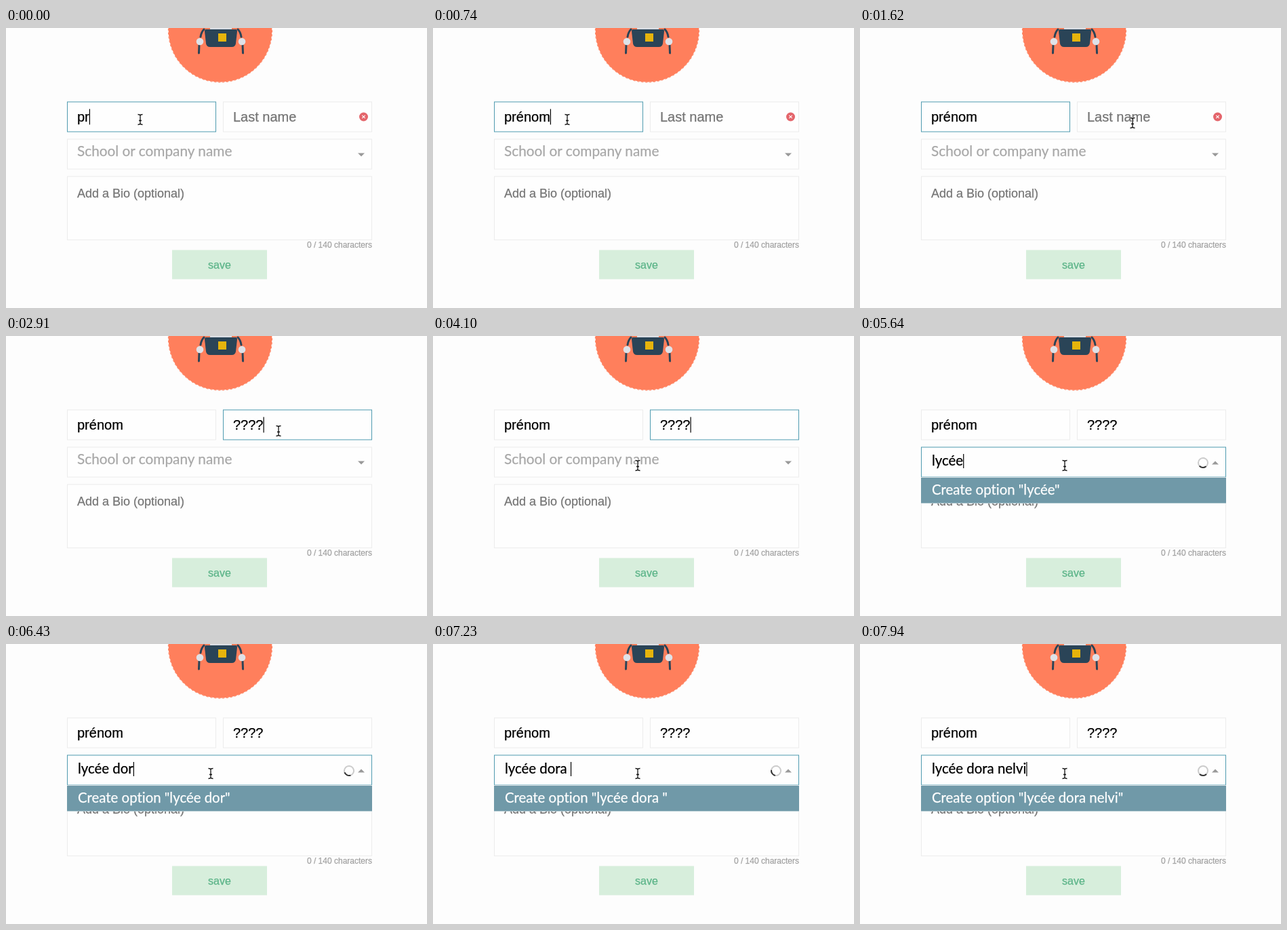
These frames come from a looping animation (621x413 px, 8000 ms). An HTML page:

```html
<!DOCTYPE html>
<html lang="en">
<head>
<meta charset="utf-8">
<title>Profile form</title>
<style>
  html, body { margin: 0; width: 100%; height: 100%; overflow: hidden; background: #fdfdfd; }
  svg { display: block; width: 621px; height: 413px; }
  text { font: 20px "Liberation Sans", Arial, sans-serif; color: #000; fill: currentColor; stroke: currentColor; stroke-width: .25px; }
  .hint { color: #757575; }
  .round { font: 20.4px Lato, sans-serif; font-variant-ligatures: none; }
  .field { fill: #fefefe; stroke: #ececec; }
  .field.focus { stroke: #4f9bb0; }
</style>
</head>
<body>
<svg viewBox="0 0 621 413">
  <!-- avatar -->
  <circle cx="316" cy="3.5" r="76.3" fill="#ff7f5c"/>
  <circle cx="316" cy="3.5" r="76.6" fill="none" stroke="#ff7f5c" stroke-dasharray="3 3"/>
  <path d="M301 0H333V3H301z" fill="#d9dde3"/>
  <path d="M295 2H339Q341 2 341 5L339 23Q338 28 333 28H301Q296 28 295 23L293 5Q293 2 295 2z" fill="#2a4457"/>
  <g fill="none" stroke="#2a4457" stroke-width="3" stroke-linecap="round">
    <path d="M292 2Q288 6 287 13M342 2Q346 6 347 13"/>
    <path d="M285 25L284.500 37M349 25L349.500 37"/>
  </g>
  <g fill="#dfe2e8"><circle cx="286" cy="20" r="5.300"/><circle cx="348" cy="20" r="5.300"/></g>
  <rect x="313" y="8" width="12" height="12" fill="#e6b40c"/>

  <!-- form -->
  <rect id="box0" class="field" x="90.500" y="109" width="219" height="44"/>
  <rect id="box1" class="field" x="320.500" y="109" width="219" height="44"/>
  <rect class="field" x="90.500" y="219" width="449" height="93.500"/>
  <text class="hint" x="105" y="250" style="font-size:18px">Add a Bio (optional)</text>
  <text x="540" y="324" text-anchor="end" style="font-size:12px;color:#a2a2a2">0 / 140 characters</text>
  <rect x="245" y="327.500" width="140" height="43" fill="#d7eedc"/>
  <text x="315" y="355" text-anchor="middle" style="font-size:16px;color:#5bb488">save</text>

  <text id="text0" x="105" y="138"/>
  <text id="hint1" class="hint" x="335" y="138">Last name</text>
  <text id="text1" x="335" y="138"/>
  <g id="error">
    <circle cx="527.500" cy="131" r="6.500" fill="#e4656b"/>
    <path d="M525.300 128.800l4.400 4.400m0-4.400l-4.400 4.400" stroke="#fff" stroke-width="1.100"/>
  </g>

  <!-- school picker -->
  <rect id="box2" class="field" x="90.500" y="164" width="449" height="44"/>
  <g id="menu">
    <rect id="list" x="90" y="209" width="450" height="37"/>
    <path d="M90 208.500H540" stroke="#dfe6e9"/>
    <path d="M90 246.500H540" stroke="#a9c3cc"/>
    <text id="option" class="round" x="106" y="233.500" style="color:#fff"/>
  </g>
  <text id="hint2" class="round" x="105" y="188.500" style="font-size:20.8px;color:#a8a8a8">School or company name</text>
  <text id="text2" class="round" x="106" y="190.500"/>
  <path id="arrow" fill="#999"/>
  <g id="spinner" fill="none" stroke-width="2">
    <circle cx="506" cy="187" r="7" stroke="#ccc"/>
    <path d="M510.950 182.050A7 7 0 0 1 510.950 191.950" stroke="#333"/>
  </g>

  <rect id="caret" width="1.200"/>
  <defs>
    <path id="beam" d="M-3.500 -7.500Q-.5 -7.500 0 -6Q.5 -7.500 3.500 -7.500M0 -6V6M-3.500 7.500Q-.5 7.500 0 6Q.5 7.500 3.500 7.500M-2 1.500H2"/>
  </defs>
  <g id="pointer" fill="none">
    <use href="#beam" stroke="#fff" stroke-width="2.600"/>
    <use href="#beam" stroke="#111" stroke-width="1.300"/>
  </g>
</svg>
<script>
const LOOP = 8000;
const OPEN = 4150;
const SEARCH = 4750;
const SPIN = 384;
const $ = id => document.getElementById(id);

const fields = [
  { from: 0, text: "prénom", keys: [0, 0, 120, 240, 480, 680], top: 119.5, height: 23 },
  { from: 1670, text: "????", keys: [2450, 2560, 2740, 2910], top: 119.5, height: 23 },
  { from: OPEN, text: "lycée dora nelvi", top: 174, height: 21,
    keys: [SEARCH, 4960, 5170, 5400, 5620, 5830, 6040, 6240, 6430, 6680, 6950, 7280, 7420, 7560, 7720, 7880] }
];
const caretOff = [[1190, 1670], [2210, 2450], [3360, 3880]];
const moves = [
  { start: 1240, end: 1600, from: [198, 135], to: [402, 140] },
  { start: 3590, end: 3920, from: [402, 140], to: [302, 191] }
];

const show = (id, on) => $(id).style.display = on ? "" : "none";
const write = (id, text) => {
  const value = text.replace(/ /g, "\u00a0");
  if ($(id).textContent !== value) $(id).textContent = value;
};
const typed = (field, t) => field.text.slice(0, field.keys.filter(key => key <= t).length);

function pointerAt(t) {
  const move = t < moves[1].start ? moves[0] : moves[1];
  const p = Math.min(1, Math.max(0, (t - move.start) / (move.end - move.start)));
  const eased = p * p * (3 - 2 * p);
  return move.from.map((a, i) => a + (move.to[i] - a) * eased);
}

function draw(t) {
  const active = fields.filter(field => field.from <= t).length - 1;
  fields.forEach((field, i) => {
    write("text" + i, typed(field, t));
    $("box" + i).classList.toggle("focus", i === active);
  });

  show("hint1", t < fields[1].keys[0]);
  show("error", t < fields[1].keys[0]);
  show("hint2", t < SEARCH);

  const open = t >= OPEN;
  const searching = t >= SEARCH;
  show("menu", open);
  show("spinner", searching);
  $("list").setAttribute("fill", searching ? "#7099a8" : "#fefefe");
  write("option", searching ? `Create option "${typed(fields[2], t)}"` : "");
  $("arrow").setAttribute("d", open ? "M519 189.500h10l-5-5z" : "M519 184.500h10l-5 5z");
  // The dark quarter points right at zero and turns clockwise.
  const angle = 35 + (t - SEARCH - 60) / SPIN * 360;
  $("spinner").setAttribute("transform", `rotate(${angle} 506 187)`);

  const { top, height } = fields[active];
  const input = $("text" + active);
  const width = input.textContent ? input.getComputedTextLength() : 0;
  const caret = $("caret");
  caret.setAttribute("x", +input.getAttribute("x") + width);
  caret.setAttribute("y", top);
  caret.setAttribute("height", height);
  show("caret", !caretOff.some(([a, b]) => t >= a && t < b));

  $("pointer").setAttribute("transform", `translate(${pointerAt(t)})`);
}

const start = performance.now();
function tick() {
  draw((performance.now() - start) % LOOP);
  requestAnimationFrame(tick);
}
tick();
</script>
</body>
</html>
```
